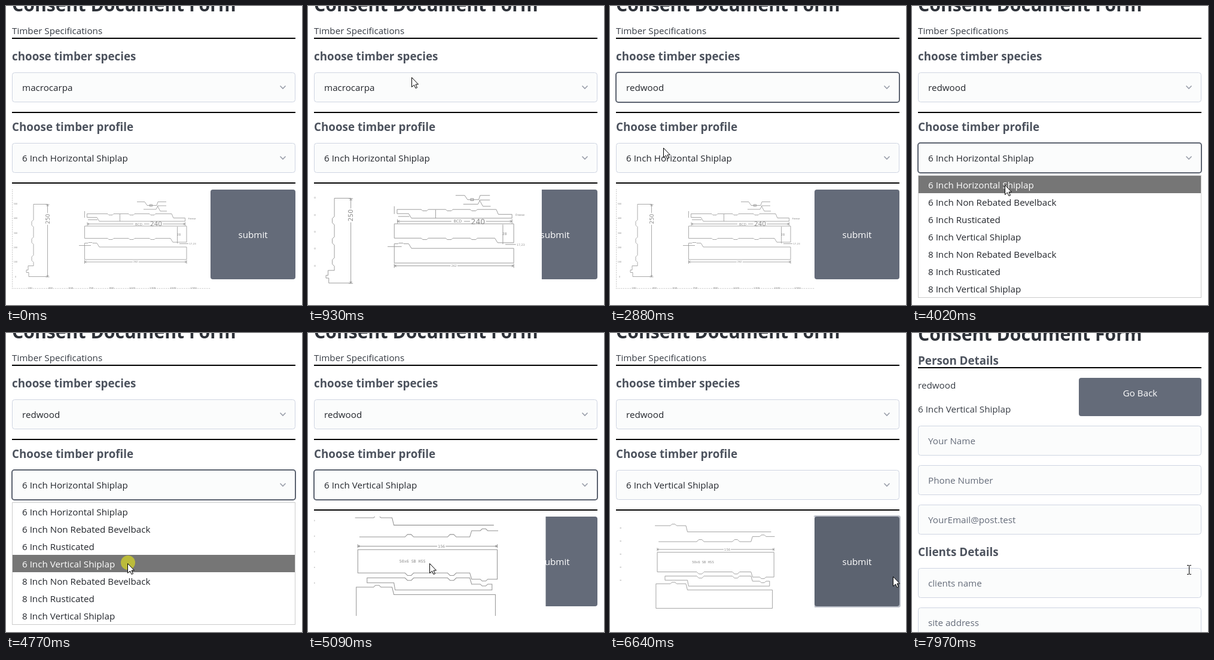
An HTML page with a canvas for the animation above (8000 ms loop, 495 px wide and 500 px high).

```html
<!DOCTYPE html>
<html lang="en">
<head>
<meta charset="utf-8">
<title>Consent Document Form</title>
<style>
  html, body { margin: 0; width: 100%; height: 100%; overflow: hidden; background: #fff; }
  canvas { display: block; }
</style>
</head>
<body>
<canvas id="stage" width="495" height="500"></canvas>
<script>
const ctx = document.getElementById('stage').getContext('2d');
const LOOP = 8000;
const FAMILY = '"Open Sans", "Noto Sans", sans-serif';
const BODY = `15.2px ${FAMILY}`;
const HEADING = `bold 18.8px ${FAMILY}`;
const TITLE = `bold 30.2px ${FAMILY}`;
const SPECIES = ['macrocarpa', 'walnut', 'redwood', 'pine'];
const PROFILES = ['6 Inch Horizontal Shiplap', '6 Inch Non Rebated Bevelback', '6 Inch Rusticated',
  '6 Inch Vertical Shiplap', '8 Inch Non Rebated Bevelback', '8 Inch Rusticated', '8 Inch Vertical Shiplap'];

const CLICK = { openSpecies: 1470, pickSpecies: 2810, openProfile: 3400, pickProfile: 4770, submit: 6570 };
const PAGE_TURN = 7170;
const CURSOR_SHOWS = 660;

// Cursor moves; each one eases out from where the last one ended
const MOVES = [
  { from: 660, to: 930, x: 174, y: 119 },
  { from: 930, to: 1410, x: 160, y: 127 },
  { from: 1810, to: 2210, x: 90, y: 237 },
  { from: 3280, to: 3400, x: 128, y: 248 },
  { from: 3930, to: 4560, x: 204, y: 385 },
  { from: 5500, to: 5830, x: 494, y: 406 },
  { from: 5840, to: 5870, x: 520, y: 408 },
  { from: 6330, to: 6500, x: 474, y: 407 },
  { from: 7770, to: 7970, x: 463, y: 396 }
];

const clamp = x => Math.max(0, Math.min(1, x));
const smooth = x => x * x * (3 - 2 * x);
const easeOut = x => 1 - (1 - x) ** 3;
const between = (t, from, to) => t >= from && t < to;

function cursorAt(t) {
  let x = 430, y = 440;
  for (const move of MOVES) {
    const p = easeOut(clamp((t - move.from) / (move.to - move.from)));
    x += (move.x - x) * p;
    y += (move.y - y) * p;
  }
  return [Math.round(x), Math.round(y)];
}

// Level of a hover transition that reverses when the pointer leaves
function hover(t, enter, leave, duration) {
  const reached = clamp((Math.min(t, leave) - enter) / duration);
  return smooth(clamp(reached - Math.max(0, t - leave) / duration));
}

function text(str, x, y, color, font = BODY, align = 'left') {
  ctx.font = font;
  ctx.fillStyle = color;
  ctx.textAlign = align;
  ctx.fillText(str, x, y);
}

function rect(x, y, w, h, color) {
  ctx.fillStyle = color;
  ctx.fillRect(x, y, w, h);
}

function roundBox(x, y, w, h, fill) {
  ctx.beginPath();
  ctx.roundRect(x, y, w, h, 4);
  ctx.fillStyle = fill;
  ctx.fill();
}

const rule = y => rect(10, y, 474, 2, '#000');
const heading = (str, y) => text(str, 10, y, '#4d535e', HEADING);

function field(y, label, color = '#646b79', focused = false) {
  const inset = focused ? 0 : 0.5;
  roundBox(10, y, 474, 50, '#fbfcfc');
  ctx.beginPath();
  ctx.roundRect(10 + inset, y + inset, 474 - 2 * inset, 50 - 2 * inset, 4);
  ctx.lineWidth = focused ? 2 : 1;
  ctx.strokeStyle = focused ? '#5c6370' : '#cfd5e2';
  ctx.stroke();
  text(label, 27, y + 31, color);
}

function select(y, label, focused) {
  field(y, label, '#23262c', focused);
  ctx.lineWidth = 1.6;
  ctx.strokeStyle = '#999ea9';
  line([458.5, y + 22.5], [463, y + 27], [467.5, y + 22.5]);
}

function dropdown(y, items, cursorY) {
  const h = items.length * 29 + 2;
  rect(10, y, 474, h, '#ccc');
  rect(11, y + 1, 472, h - 2, '#fff');
  const active = Math.max(0, Math.floor((cursorY - y - 1) / 29));
  items.forEach((item, i) => {
    const top = y + 1 + i * 29;
    if (i === active) rect(11, top, 472, 29, '#767676');
    text(item, 27, top + 21, i === active ? '#fff' : '#23262c');
  });
}

function trace(...points) {
  points.forEach(([x, y]) => ctx.lineTo(x, y));
}

function line(...points) {
  ctx.beginPath();
  trace(...points);
  ctx.stroke();
}

// Straight edge with small trapezoid bumps at the given centres
function traceBumps(x1, x2, y, depth, centers) {
  const outer = 3 + Math.abs(depth);
  trace([x1, y]);
  for (const c of centers) trace([c - outer, y], [c - 3, y + depth], [c + 3, y + depth], [c + outer, y]);
  trace([x2, y]);
}

function note(str, x, y, size = 5, font = 'DejaVu Sans') {
  text(str, x, y, '#8c8c8c', `${size}px "${font}", sans-serif`, 'center');
}

// Dimension line with end marks and a label set into a gap
function dimension(x1, x2, y, label, size, at = (x1 + x2) / 2) {
  const gap = label.length * size * 0.33 + 1;
  line([x1, y], [at - gap, y]);
  line([at + gap, y], [x2, y]);
  for (const [x, side] of [[x1, 3], [x2, -3]]) {
    line([x, y - 3], [x, y + 3]);
    line([x + side, y - 1.5], [x, y], [x + side, y + 1.5]);
  }
  note(label, at, y + size * 0.36, size);
}

function turned(x, y, angle, draw) {
  ctx.save();
  ctx.translate(x, y);
  ctx.rotate(angle);
  draw();
  ctx.restore();
}

function rulers() {
  ctx.strokeStyle = '#b0b0b0';
  ctx.setLineDash([1, 2]);
  line([10.5, 307], [10.5, 472.5], [342, 472.5]);
  ctx.setLineDash([]);
  for (let i = 0; i < 6; i++) note(500 - i * 100, 16, 332 + i * 24.3, 3.5);
  for (let i = 0; i < 9; i++) note(100 + i * 200, 40 + i * 34.2, 472.5, 4);
}

function horizontalDrawing() {
  const notches = [175, 210, 245];
  rulers();
  ctx.strokeStyle = '#959595';
  ctx.lineWidth = 0.8;

  // End profile
  turned(46, 331.5, Math.PI / 2, () => {
    ctx.beginPath();
    trace([0, -24]);
    traceBumps(0, 103, 0, 3, [32, 61, 91]);
    trace([103, 9], [110, 9], [110, 12], [114, 12], [114, 8], [121, 8], [121, -24]);
    ctx.stroke();
  });
  turned(69.5, 453, -Math.PI / 2, () => dimension(0, 121, 0, '250', 9, 97));

  // Joint detail
  line([219, 327.5], [232, 327.5], [236, 333.5], [252, 333.5], [254, 327.5], [268, 327.5]);
  line([230, 340], [251, 340], [254, 334], [268, 334]);
  line([253, 334], [258, 343], [269, 343]);
  ctx.strokeRect(240.5, 332, 4, 3);

  // Boards
  ctx.beginPath();
  traceBumps(135.5, 277, 347.5, 2, notches);
  trace([280, 354.5], [299.5, 354.5], [299.5, 360], [156, 360], [152, 353.5], [135.5, 353.5]);
  ctx.closePath();
  ctx.stroke();
  ctx.beginPath();
  trace([302, 395], [302, 368], [131.5, 368]);
  traceBumps(131.5, 275, 388.5, 2, notches);
  trace([279, 395]);
  ctx.closePath();
  ctx.stroke();
  ctx.beginPath();
  traceBumps(131.5, 152, 396.5, -1, [141]);
  trace([156, 403], [302, 403], [302, 424], [131.5, 424]);
  ctx.closePath();
  ctx.stroke();

  // Measures
  dimension(136, 299.5, 364.5, '240', 10.5, 251);
  rect(213, 362, 18, 5, '#fff');
  note('BCD', 222, 366.5, 5.5);
  dimension(131.5, 302, 428, '262', 4);
  line([190.5, 348], [190.5, 360]);
  line([286.5, 369], [286.5, 397]);
  line([290, 397.5], [305, 397.5]);
  line([122, 400.5], [142, 400.5]);
  line([131.5, 343], [131.5, 354]);
  line([137, 357.5], [153, 357.5]);
  note('Freese', 311, 357, 4);
  note('17,23', 312, 399, 4);
  note('28', 289, 384);
}

function verticalDrawing() {
  const traceLap = (x1, x2, y) => {
    traceBumps(x1, 138, y, -3, [114]);
    trace([141, y + 12], [x2, y + 12]);
  };
  const traceTongue = (x1, x2, y, side) => {
    traceBumps(x1, 264, y, side * 4, [166, 235]);
    traceBumps(267, x2, y + side * 10, side * 3, [287]);
  };
  for (let i = 0; i < 5; i++) rect(10, 315 + i * 25.3, 3, 2, '#ccc');
  ctx.strokeStyle = '#959595';
  ctx.lineWidth = 1;

  ctx.beginPath();
  traceLap(78, 303, 311.5);
  ctx.stroke();
  ctx.beginPath();
  traceTongue(85, 310, 342.5, -1);
  ctx.stroke();
  dimension(82.5, 308.5, 357.5, '156', 6, 218);

  ctx.beginPath();
  trace([308.5, 363], [82.5, 363]);
  traceTongue(82.5, 308.5, 401, 1);
  ctx.closePath();
  ctx.stroke();
  note('50x6 SB HSS', 171, 384.5, 6.4, 'DejaVu Sans Mono');

  ctx.beginPath();
  traceTongue(97.5, 300, 409, 1);
  trace([300, 428.5], [143, 428.5], [141, 417]);
  traceBumps(141, 97.5, 417, -3, []);
  ctx.closePath();
  ctx.stroke();

  ctx.beginPath();
  traceLap(80, 305.5, 424);
  trace([305.5, 471.5], [80, 471.5]);
  ctx.closePath();
  ctx.stroke();
}

function preview(scale, vertical) {
  ctx.save();
  ctx.beginPath();
  ctx.rect(10, 307, 474, 166);
  ctx.clip();
  ctx.translate(57, 390);
  ctx.scale(scale, scale);
  rect(-47, -83, 332, 166, '#fff');
  if (vertical) ctx.scale(1 / 1.158, 1 / 1.158);
  ctx.translate(-57, -390);
  (vertical ? verticalDrawing : horizontalDrawing)();
  ctx.restore();
}

function arrow(x, y) {
  turned(x - 0.5, y + 0.5, 0, () => {
    ctx.lineWidth = 1;
    ctx.strokeStyle = '#000';
    ctx.fillStyle = '#fff';
    ctx.beginPath();
    trace([0, 0], [0, 16], [4, 12.5], [6.5, 18], [9, 17], [6.5, 11.5], [11, 11.5]);
    ctx.closePath();
    ctx.fill();
    ctx.stroke();
  });
}

function ibeam(x, y) {
  rect(x, y - 7, 1, 14, '#000');
  for (const dy of [-8, 7]) {
    rect(x - 3, y + dy, 3, 1, '#000');
    rect(x + 1, y + dy, 3, 1, '#000');
  }
}

function timberPage(t) {
  const [x, y] = cursorAt(t);
  const speciesPicked = t >= CLICK.pickSpecies + 65;
  const profilePicked = t >= CLICK.pickProfile + 50;
  const zoom = hover(t, 660, 910, 300) + hover(t, 4820, 5743, 300);
  const dark = hover(t, 5600, 5840, 200) + hover(t, 6370, LOOP, 200);

  text('Consent Document Form', 10, 8.5, '#2d3138', TITLE);
  text('Timber Specifications', 10, 47, '#373c44');
  rule(53);
  heading('choose timber species', 91);
  select(111, SPECIES[speciesPicked ? 2 : 0], between(t, CLICK.openSpecies, CLICK.openProfile));
  rule(177);
  heading('Choose timber profile', 209);
  select(229, PROFILES[profilePicked ? 3 : 0], between(t, CLICK.openProfile, CLICK.submit));
  rule(295);

  if (t >= CLICK.submit) roundBox(340, 305, 146, 154, '#bbbfc8');
  roundBox(342, 307, 142, 150, `rgb(${100 - 8 * dark},${107 - 8 * dark},${121 - 9 * dark})`);
  text('submit', 413, 388, '#fff', BODY, 'center');
  preview(1 + 0.2 * zoom, profilePicked);

  if (t >= CLICK.openSpecies + 60 && !speciesPicked) dropdown(165, SPECIES, y);
  if (t >= CLICK.openProfile + 140 && !profilePicked) dropdown(283, PROFILES, y);

  if (t < CURSOR_SHOWS) return;
  if (Object.values(CLICK).some(c => between(t, c, c + 50))) {
    ctx.beginPath();
    ctx.arc(x, y - 1, 12, 0, Math.PI * 2);
    ctx.fillStyle = 'rgba(255,255,0,0.5)';
    ctx.fill();
  }
  arrow(x, y);
}

function personPage(t) {
  text('Consent Document Form', 10, 13, '#2d3138', TITLE);
  heading('Person Details', 53);
  rule(57);
  text(SPECIES[2], 10, 93, '#373c44');
  text(PROFILES[3], 10, 133, '#373c44');
  roundBox(279, 75, 205, 64, '#646b79');
  text('Go Back', 381.5, 106, '#fff', BODY, 'center');
  ['Your Name', 'Phone Number', 'YourEmail@post.test'].forEach((label, i) => field(155 + i * 66, label));
  heading('Clients Details', 373);
  ['clients name', 'site address'].forEach((label, i) => field(393 + i * 66, label));
  ibeam(...cursorAt(t));
}

const start = performance.now();
function frame() {
  const t = (performance.now() - start) % LOOP;
  rect(0, 0, 495, 500, '#fff');
  (t < PAGE_TURN ? timberPage : personPage)(t);
  requestAnimationFrame(frame);
}
frame();
</script>
</body>
</html>
```
